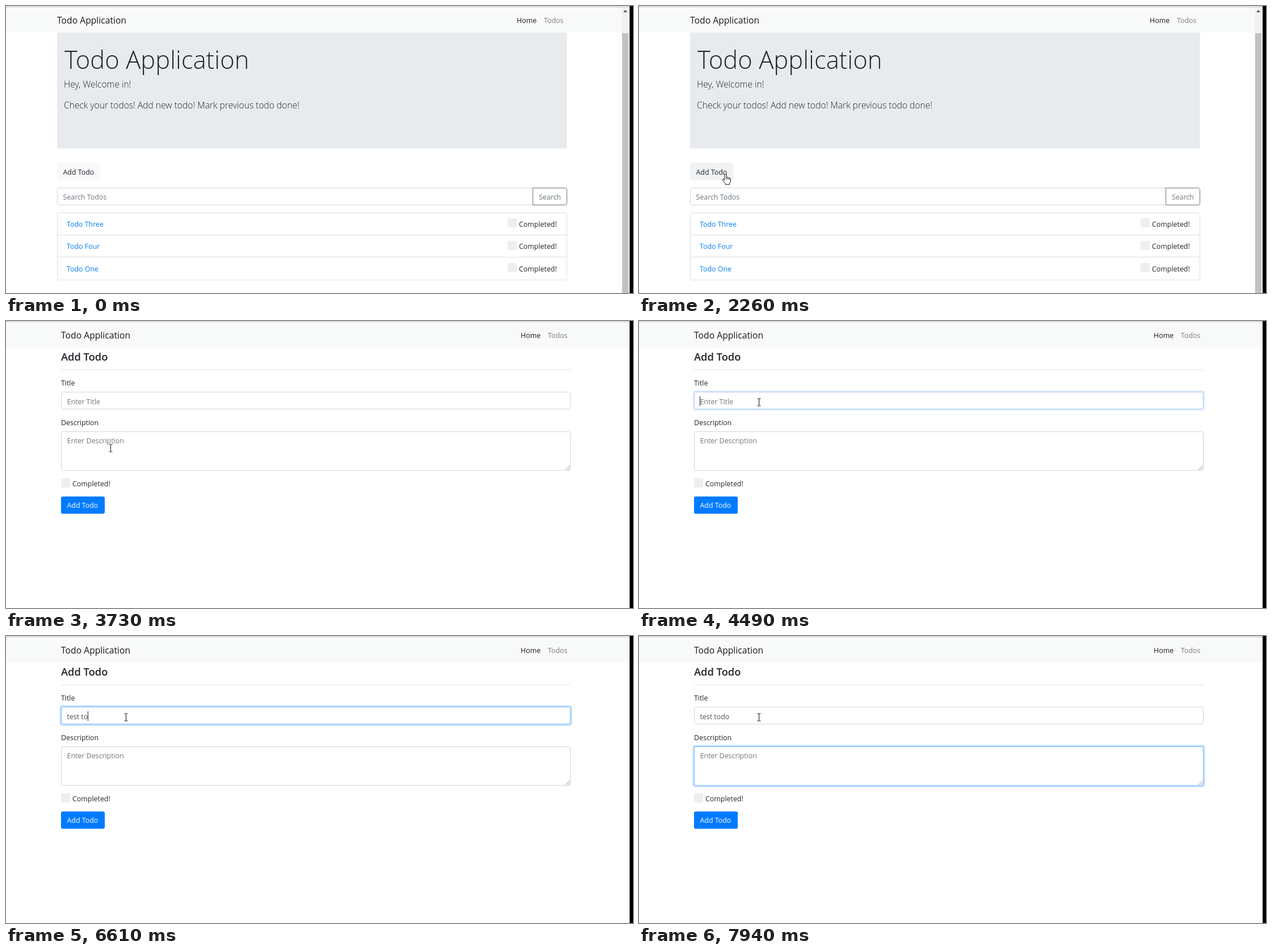
These frames come from a looping animation (1105x507 px, 8 s). An HTML page with a canvas:

```html
<!DOCTYPE html>
<html lang="en">
<head>
<meta charset="utf-8">
<title>Todo Application</title>
<style>
  html, body { margin: 0; width: 100%; height: 100%; overflow: hidden; background: #fff; }
  canvas { display: block; }
</style>
</head>
<body>
<canvas id="stage" width="1105" height="507"></canvas>
<script>
const ctx = document.getElementById('stage').getContext('2d');
const LOOP = 8000;
const PAGE_SWITCH = 3730;
const INK = '#212529', MUTED = '#6c757d', LINK = '#0a80f5', BORDER = '#ced4da';
const BODY = 12.4;

const clamp01 = v => Math.max(0, Math.min(1, v));
const ramp = (t, a, b) => clamp01((t - a) / (b - a));
const mix = (a, b, p) => a + (b - a) * p;
const mixRgb = (a, b, p) => `rgb(${a.map((v, i) => Math.round(mix(v, b[i], p))).join()})`;
const smooth = p => p * p * (3 - 2 * p);

function text(str, x, y, color = INK, size = BODY, weight = 400) {
  ctx.font = `${weight} ${size}px "Open Sans", "Noto Sans", sans-serif`;
  ctx.fillStyle = color;
  ctx.fillText(str, x, y);
}

function rect(x, y, w, h, color) {
  ctx.fillStyle = color;
  ctx.fillRect(x, y, w, h);
}

function box(x, y, w, h, radius, fill, stroke) {
  ctx.beginPath();
  ctx.roundRect(x, y, w, h, radius);
  if (fill) { ctx.fillStyle = fill; ctx.fill(); }
  if (stroke) { ctx.strokeStyle = stroke; ctx.lineWidth = 1; ctx.stroke(); }
}

// Form field with a focus ring of strength 0..1
function field(x, y, w, h, focus = 0) {
  if (focus) box(x - 3, y - 3, w + 6, h + 6, 5, `rgba(0,123,255,${0.25 * focus})`);
  box(x, y, w, h, 3, '#fff', mixRgb([206, 212, 218], [128, 189, 255], focus));
}

function navbar(shift, right) {
  rect(0, 2, right, 45, '#f8faf9');
  rect(0, 1, 1099, 1, '#b8b8b8');
  text('Todo Application', 90 + shift, 31, 'rgba(0,0,0,.9)', 15.7);
  text('Home', 900 + shift, 29.5, 'rgba(0,0,0,.9)');
  text('Todos', 948 + shift, 29.5, 'rgba(0,0,0,.5)');
}

function scrollbar() {
  rect(1085, 2, 14, 505, '#f1f1f1');
  rect(1086, 48, 11, 459, '#c1c1c1');
  ctx.beginPath();
  ctx.moveTo(1088, 11);
  ctx.lineTo(1091.5, 7);
  ctx.lineTo(1095, 11);
  ctx.fillStyle = '#505050';
  ctx.fill();
}

function addButton(t) {
  const hover = ramp(t, 2180, 2400);
  const press = ramp(t, 2640, 2720) - ramp(t, 2800, 2880);
  const ring = ramp(t, 2640, 2880);
  if (ring) box(88, 275, 81, 36, 5, `rgba(216,219,222,${0.5 * ring})`);
  const fill = press > 0
    ? mixRgb([225, 229, 233], [218, 224, 229], press)
    : mixRgb([248, 249, 250], [225, 229, 233], hover);
  box(90, 277, 76.5, 31, 3, fill);
  text('Add Todo', 100.5, 297.5);
}

function listPage(t) {
  navbar(0, 1085);
  scrollbar();
  rect(90, 47, 898.5, 204.5, '#e8ebee');
  text('Todo Application', 103, 111, INK, 43.6, 300);
  text('Hey, Welcome in!', 102, 144, INK, 15.6, 300);
  text('Check your todos! Add new todo! Mark previous todo done!', 102, 181, INK, 15.6, 300);
  addButton(t);

  box(90.5, 321.5, 839, 30, [3, 0, 0, 3], '#fff', BORDER);
  text('Search Todos', 100.5, 342, MUTED);
  box(928.5, 321.5, 60, 30, [0, 3, 3, 0], '#fff', MUTED);
  text('Search', 939, 341.5, MUTED);

  box(90.5, 365.5, 898, 118.5, 3, '#fff', '#dfdfdf');
  ['Todo Three', 'Todo Four', 'Todo One'].forEach((name, i) => {
    const y = 365 + i * 39.7;
    if (i) rect(91, Math.round(y) - 1, 897, 1, '#dfdfdf');
    text(name, 107, y + 24.7, LINK);
    rect(884, Math.round(y + 10), 16, 16, '#eee');
    text('Completed!', 904, y + 24.7);
  });
}

// Time at which each part of the title has been typed
const TYPING = [
  [5360, 't'], [5440, 'te'], [5520, 'tes'], [5680, 'test'], [6060, 'test '],
  [6460, 'test t'], [6610, 'test to'], [6860, 'test tod'], [6990, 'test todo']
];
const HISTORY = ['todo two updated', 'todo onesdds', 'todo one updated', 'Todo Two', 'todo twoxs', 'tes'];
const TITLE_FOCUS = 4440, NOTE_FOCUS = 7390, BLINK = 530;

function caret(t, since, x, y) {
  if (Math.floor((t - since) / BLINK) % 2 === 0) rect(x, y, 1, 17, '#222');
}

function suggestions(t) {
  if (t < 4510 || t >= 5520) return;
  const items = t < 5440 ? HISTORY : HISTORY.slice(-1);
  ctx.save();
  ctx.shadowColor = 'rgba(0,0,0,.4)';
  ctx.shadowBlur = 3;
  ctx.shadowOffsetY = 1;
  rect(97, 157, 155, 13 + items.length * 29.2, '#fff');
  ctx.restore();
  items.forEach((item, i) => text(item, 107, 182 + i * 29.15, INK, 10.1, 600));
}

function grip() {
  ctx.strokeStyle = '#777';
  ctx.lineWidth = 0.9;
  ctx.beginPath();
  ctx.moveTo(986.5, 263);
  ctx.lineTo(993.5, 256);
  ctx.moveTo(990.5, 263);
  ctx.lineTo(993.5, 260);
  ctx.stroke();
}

function formPage(t) {
  const noteFocus = ramp(t, NOTE_FOCUS - 60, NOTE_FOCUS + 150) * (t >= NOTE_FOCUS);
  const titleFocus = ramp(t, TITLE_FOCUS - 30, TITLE_FOCUS + 140) * (t >= TITLE_FOCUS) * (1 - noteFocus);
  const typed = TYPING.filter(([at]) => t >= at).pop();

  navbar(7, 1099);
  text('Add Todo', 97, 69.5, INK, 18.3, 600);
  rect(97, 86, 898, 1, '#e5e5e5');

  text('Title', 97, 114);
  field(97.5, 125.5, 897, 30, titleFocus);
  if (typed) text(typed[1], 107.5, 146.5, '#495057');
  else text('Enter Title', 107.5, 146.5, '#757575');
  if (t >= TITLE_FOCUS && t < NOTE_FOCUS) {
    const width = typed ? ctx.measureText(typed[1]).width : 0;
    caret(t, typed ? typed[0] : TITLE_FOCUS, Math.round(107 + width), 133);
  }

  text('Description', 97, 184);
  field(97.5, 195.5, 897, 68.5, noteFocus);
  text('Enter Description', 107.5, 215.5, '#757575');
  grip();
  if (t >= NOTE_FOCUS) caret(t, NOTE_FOCUS + 20, 107, 202);

  rect(97, 278, 16, 16, '#eee');
  text('Completed!', 117, 292);
  box(97, 310, 77, 30.5, 3, '#007bff');
  text('Add Todo', 107.5, 330, '#fff');
  suggestions(t);
}

// Pointer moves: start, ms per step, steps, from, bend, to
const MOVES = [
  [690, 70, 2, [993, 504], [970, 496], [947, 488]],
  [910, 71.8, 12, [947, 488], [640, 365], [310, 246]],
  [1770, 80, 6, [310, 246], [270, 225], [152, 296]],
  [3260, 78, 6, [152, 296], [158, 258], [178, 231]],
  [3730, 70, 1, [178, 231], [181, 228], [184, 224]],
  [3880, 70, 8, [184, 224], [196, 178], [211, 143]]
];

function pointerAt(t) {
  const move = MOVES.filter(([start]) => t >= start).pop();
  if (!move) return null;
  const [start, step, count, a, b, c] = move;
  const raw = Math.min(1, (Math.floor((t - start) / step) + 1) / count);
  const p = count > 2 ? smooth(raw) : raw;
  return a.map((v, i) => mix(mix(v, b[i], p), mix(b[i], c[i], p), p));
}

const inside = (x, y, l, top, r, bottom) => x >= l && x <= r && y >= top && y <= bottom;

function pointerKind(x, y, t) {
  if (t < PAGE_SWITCH) {
    if (inside(x, y, 90, 277, 166, 308) || inside(x, y, 929, 321, 988, 352)) return 'hand';
    return inside(x, y, 90, 47, 988, 251) || inside(x, y, 90, 321, 929, 352) ? 'beam' : 'arrow';
  }
  return inside(x, y, 97, 195, 995, 264) || inside(x, y, 97, 125, 995, 156) ? 'beam' : 'arrow';
}

const ARROW = new Path2D('M0 0V14L3.2 11L5.4 16L7.5 15.1L5.4 10.3H10Z');
const HAND = new Path2D('M-1.6 1.3Q0 -1 1.6 1.3V6.2Q3.3 5.2 4.2 6.8Q6 6 6.8 7.6Q8.7 7 9 9V13Q8.8 15 7.2 16.6V18.7H-.4V17.2L-5.2 11Q-5.6 8.8 -3.6 9.4L-1.6 11.4Z');
const KNUCKLES = new Path2D('M1.6 6V9.5M4.2 7V10M6.8 8V10.5');
const BEAM = new Path2D('M-3 -6.5H-1Q0 -6.5 0 -5.5Q0 -6.5 1 -6.5H3M0 -5.5V5.5M-3 6.5H-1Q0 6.5 0 5.5Q0 6.5 1 6.5H3');

function pointer(t) {
  const at = pointerAt(t);
  if (!at) return;
  const [x, y] = at.map(Math.round);
  const kind = pointerKind(x, y, t);
  ctx.save();
  ctx.translate(x + 0.5, y + 0.5);
  ctx.lineWidth = 1;
  ctx.strokeStyle = '#111';
  ctx.fillStyle = '#fff';
  if (kind === 'beam') {
    ctx.stroke(BEAM);
  } else {
    const shape = kind === 'hand' ? HAND : ARROW;
    ctx.fill(shape);
    ctx.stroke(shape);
    if (kind === 'hand') ctx.stroke(KNUCKLES);
  }
  ctx.restore();
}

function draw(t) {
  rect(0, 0, 1105, 507, '#fff');
  if (t < PAGE_SWITCH) listPage(t);
  else formPage(t);
  rect(1099, 0, 6, 507, '#000');
  pointer(t);
}

const begin = performance.now();
function tick() {
  draw((performance.now() - begin) % LOOP);
  requestAnimationFrame(tick);
}
tick();
</script>
</body>
</html>
```
